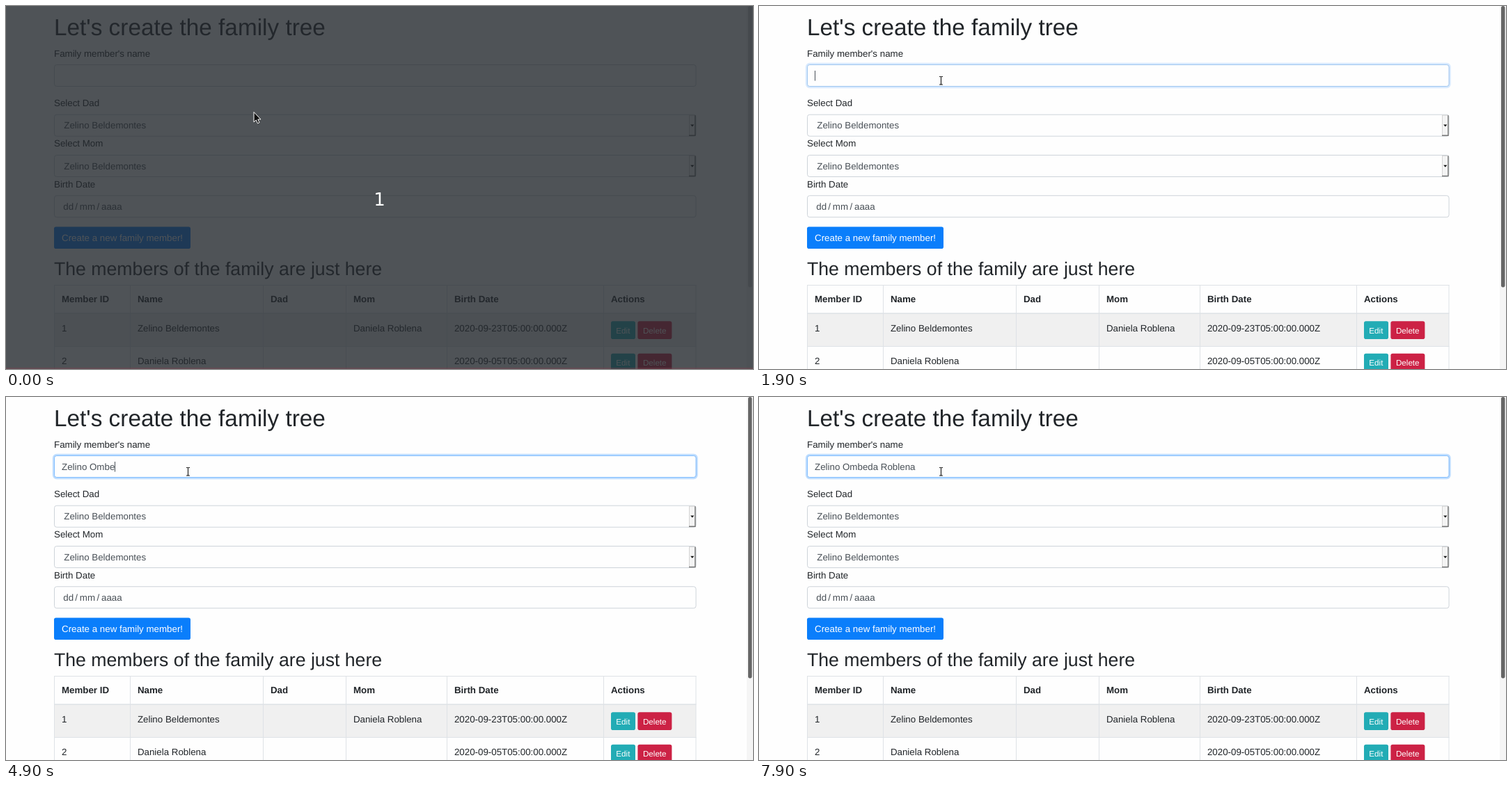
Recreate the animation shown at these times as an HTML page. Size 1073 by 522 pixels, loop 8000 ms.

```html
<!DOCTYPE html>
<html lang="en">
<head>
<meta charset="utf-8">
<title>Family tree</title>
<style>
  html, body { margin: 0; width: 100%; height: 100%; overflow: hidden; background: #fefefe; }
  svg { display: block; width: 1073px; height: 522px; }
  text {
    font: 13.333px "Liberation Sans", Arial, sans-serif;
    fill: #212529; white-space: pre; text-rendering: geometricPrecision;
  }
  .h1 { font-size: 33.333px; }
  .h2 { font-size: 26.667px; }
  .bold { font-weight: bold; }
  .field { fill: #495057; }
  .light { fill: #fff; }
  .small { font-size: 11.667px; fill: #fff; }
  .box { fill: #fefefe; stroke: #ced4da; }
  .line { stroke: #dee2e6; fill: none; }
  .count { font: 26px "DejaVu Sans", sans-serif; fill: #fff; text-anchor: middle; }
</style>
</head>
<body>
<svg viewBox="0 0 1073 522">
  <g id="page"></g>
  <g id="focus">
    <rect x="68.2" y="83.2" width="924.2" height="33.6" rx="4.5" fill="none" stroke="#007bff" stroke-opacity=".25" stroke-width="2.7"/>
    <rect x="69.5" y="84.5" width="921.6" height="31" rx="3.3" fill="#fefefe" stroke="#80bdff"/>
  </g>
  <text id="typed" class="field" x="80" y="104.7"></text>
  <rect id="caret" y="93" width="1" height="14.5" fill="#495057"/>
  <rect x="1064" width="9" height="522" fill="#f5f5f5"/>
  <rect id="thumb" x="1066" y="0" width="5.5" height="404.5" rx="2.7"/>
  <g id="countdown">
    <rect width="1073" height="522" fill="#24292e" fill-opacity=".8"/>
    <rect y="520" width="1073" height="2" fill="#80404c" fill-opacity=".35"/>
    <text class="count" x="536.5" y="287">1</text>
  </g>
  <g id="arrow">
    <path d="M1 1.5V16L4.3 13 6.5 18 9 17 7 12H11Z" fill="#000" opacity=".15"/>
    <path d="M0 0V14.4L3.3 11.5 5.5 16.3 8 15.2 5.8 10.5H10Z" fill="#111" stroke="#fff" stroke-width="1"/>
  </g>
  <path id="beam" d="M259 101.5H260.6L261.5 102.2 262.4 101.5H264M261.5 102V112.5M259 113H260.6L261.5 112.3 262.4 113H264" fill="none" stroke="#222" stroke-width="1.2"/>
</svg>
<script>
const LOOP = 8000;
const byId = id => document.getElementById(id);
const father = 'Zelino Beldemontes', mother = 'Daniela Roblena';

const text = (x, y, content, cls = '') => `<text x="${x}" y="${y}" class="${cls}">${content}</text>`;
const box = y => `<rect class="box" x="69.5" y="${y}" width="921.6" height="31" rx="3.3"/>`;
const button = (x, y, w, h, color) => `<rect x="${x}" y="${y}" width="${w}" height="${h}" rx="2.8" fill="${color}"/>`;

const select = y => box(y) + text(83.3, y + 20.2, father, 'field') +
  `<rect x="981.5" y="${y + 1}" width="8" height="29" fill="#f4f4f4" stroke="#d4d4d4"/>
   <path d="M990 ${y + 1}V${y + 30}H981" fill="none" stroke="#777" stroke-width="1.4"/>
   <path d="M983.2 ${y + 14.3}h5.2l-2.6 2.9z" fill="#111"/>`;

const columns = [69.5, 178.5, 369.5, 488.5, 633.5, 858.5];
const row = (y, cells, cls) =>
  cells.map((cell, i) => cell && text(columns[i] + 10.4, y, cell, cls)).join('');
const actions = y =>
  button(869, y, 35, 25.8, '#22acb5') + text(876.3, y + 17.3, 'Edit', 'small') +
  button(907.4, y, 49, 25.8, '#cc2245') + text(914.9, y + 17.3, 'Delete', 'small');

byId('page').innerHTML =
  text(69, 42.4, "Let's create the family tree", 'h1') +
  text(69, 72.5, "Family member's name") + box(84.5) +
  text(69, 143.9, 'Select Dad') + select(156.2) +
  text(69, 202.3, 'Select Mom') + select(214.5) +
  text(69, 260.6, 'Birth Date') + box(272.7) +
  [[82.3, 'dd'], [99.3, '/'], [105.8, 'mm'], [130.6, '/'], [137, 'aaaa']]
    .map(([x, part]) => text(x, 293, part, 'field')).join('') +
  button(69, 317.4, 196, 31.7, '#0a7efb') +
  text(80, 338, 'Create a new family member!', 'light') +
  text(69, 387.4, 'The members of the family are just here', 'h2') +
  '<rect x="69" y="442" width="922" height="47" fill="#f0f0f0"/>' +
  `<path class="line" d="M69 401.5H991.5M69 489.5H991.5${[...columns, 991].map(x => `M${x} 401V522`).join('')}"/>` +
  '<path class="line" d="M69 442H991.5" stroke-width="1.7"/>' +
  row(426.4, ['Member ID', 'Name', 'Dad', 'Mom', 'Birth Date', 'Actions'], 'bold') +
  row(468.1, ['1', father, '', mother, '2020-09-23T05:00:00.000Z']) + actions(453.2) +
  row(514.6, ['2', mother, '', '', '2020-09-05T05:00:00.000Z']) + actions(499.8);

const phrase = 'Zelino Ombeda Roblena';
const keyTimes = [2700, 3100, 3300, 3300, 3500, 3600, 3800, 4300, 4600, 4700, 4900,
  5500, 5700, 6000, 6900, 7100, 7300, 7400, 7500, 7600, 7700];
const caretGaps = [[4200, 4300], [5400, 5500], [6600, 6900], [7900, 8000]];
const typed = byId('typed');
const show = (id, visible) => byId(id).style.display = visible ? '' : 'none';

function draw(t) {
  const focused = t >= 1900;
  show('countdown', t < 200);
  show('arrow', !focused);
  show('beam', focused);
  show('focus', focused);
  byId('focus').style.opacity = t < 2000 ? 0.6 : 1;
  byId('thumb').setAttribute('fill', focused ? '#666' : '#cdcdcd');

  const [x, y] = t < 1600 ? [356, 152.5] : t < 1700 ? [261.5, 125] : [258.5, 120.5];
  byId('arrow').setAttribute('transform', `translate(${x} ${y})`);

  typed.textContent = phrase.slice(0, keyTimes.filter(time => time <= t).length);
  const width = typed.textContent ? typed.getComputedTextLength() : 0;
  byId('caret').setAttribute('x', Math.round(80 + width));
  show('caret', focused && !caretGaps.some(([from, to]) => t >= from && t < to));
}

function tick() {
  draw(performance.now() % LOOP);
  requestAnimationFrame(tick);
}
tick();
</script>
</body>
</html>
```
